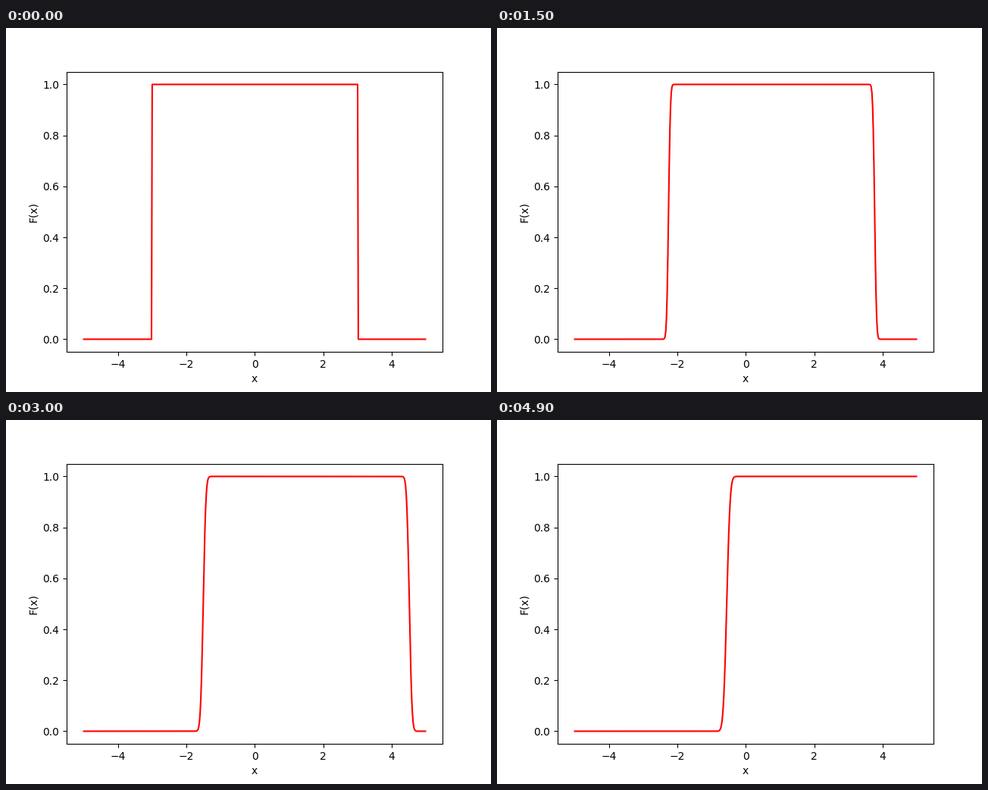
A matplotlib script that plays this animation: 640x480 px, repeating every 5000 ms.

```python
import math

import matplotlib.pyplot as plt
import numpy as np
from matplotlib.animation import FuncAnimation

FRAMES = 50
INTERVAL = 100        # ms
STEP = 0.05           # distance travelled per frame
DIFFUSION = 0.0025    # variance gained per unit of distance
DX = 0.02
EDGE = 3 + DX / 2

x = np.arange(500) * DX - 5
erf = np.vectorize(math.erf)


def front(offset, sigma):
    """Rising step at offset 0, smeared to a width of sigma."""
    if sigma == 0:
        return (offset > 0).astype(float)
    return 0.5 * (1 + erf(offset / (sigma * math.sqrt(2))))


def pulse(frame):
    """Square pulse carried to the right while its edges spread."""
    shift = STEP * frame
    sigma = math.sqrt(DIFFUSION * shift)
    return front(x - shift + EDGE, sigma) - front(x - shift - EDGE, sigma)


fig, ax = plt.subplots(figsize=(6.4, 4.8), dpi=100)
line, = ax.plot(x, pulse(0), color="red", linewidth=1.5)
ax.set_xlabel("x")
ax.set_ylabel("F(x)")
ax.set_xlim(ax.get_xlim())
ax.set_ylim(ax.get_ylim())


def update(frame):
    line.set_ydata(pulse(frame))
    return line,


animation = FuncAnimation(fig, update, frames=FRAMES, interval=INTERVAL,
                          repeat=True, repeat_delay=0)
plt.show()
```
